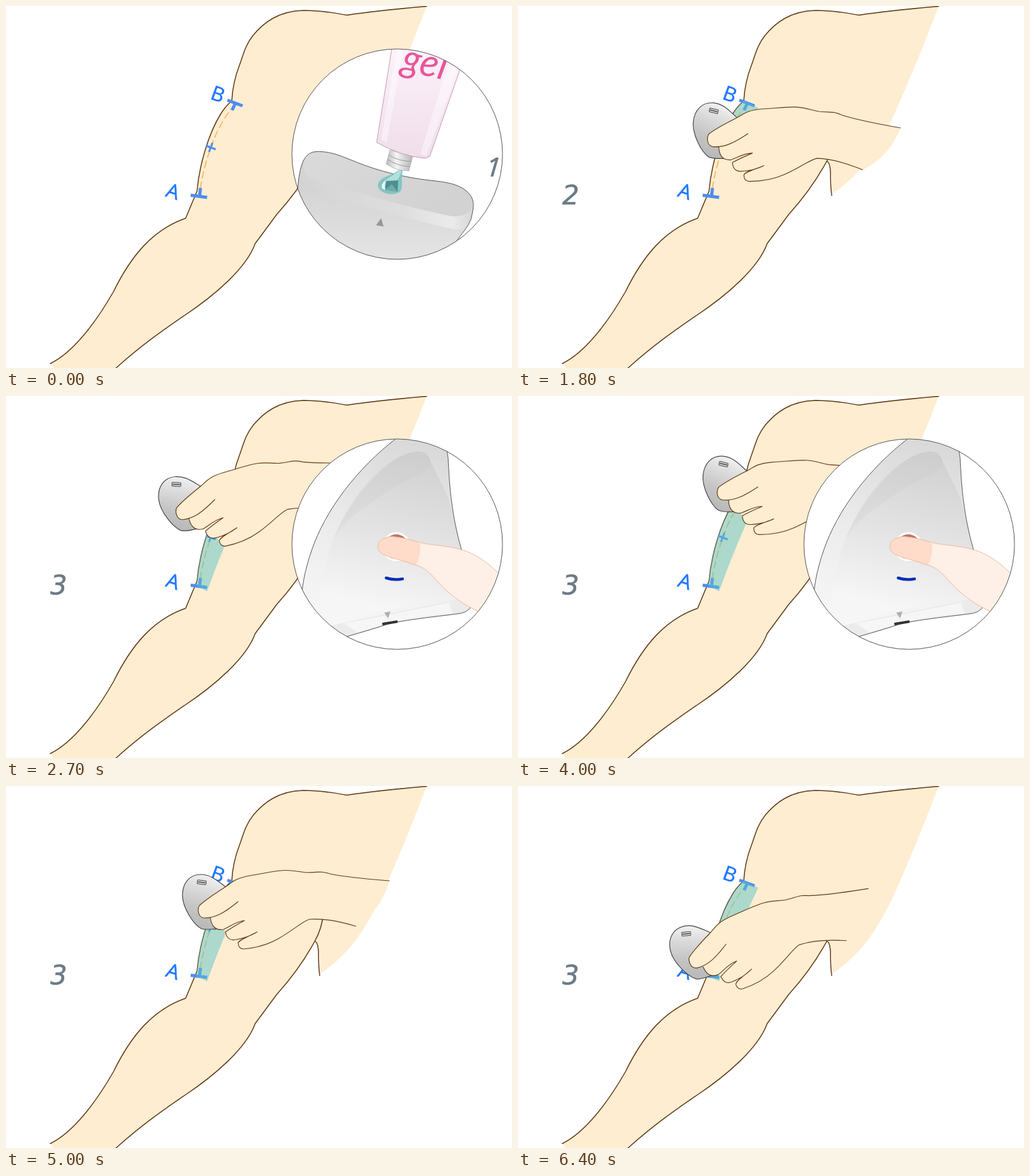
Write an HTML page that moves like this. It is 800 by 573 pixels and loops after 6.5 s.

```html
<!DOCTYPE html>
<html lang="en">
<head>
<meta charset="utf-8">
<title>Gel treatment steps</title>
<style>
html, body { margin: 0; width: 100%; height: 100%; overflow: hidden; background: #fff; }
svg { display: block; width: 100%; height: 100%; }
.skin { fill: #ffedd1; }
.line { fill: none; stroke: #603813; stroke-width: 1.5; stroke-linejoin: round; stroke-linecap: round; }
.thin { stroke-width: 1.15; }
.mark { fill: none; stroke: #4b8df2; stroke-width: 5; }
.label { font: 32px "Open Sans", "Noto Sans", sans-serif; fill: #1f78ff; stroke: #1f78ff; stroke-width: .5; }
.step { font: italic 42px "DejaVu Sans", sans-serif; fill: #6b7b85; stroke: #6b7b85; stroke-width: .6; }
.edge { fill: none; stroke: #555; stroke-width: 1; }
</style>
</head>
<body>
<svg viewBox="0 0 800 573" preserveAspectRatio="none">
  <defs>
    <clipPath id="round"><circle cx="618.5" cy="234.5" r="166.5"/></clipPath>
    <clipPath id="swept"><rect id="sweep" width="800" height="573"/></clipPath>
    <linearGradient id="shell" x1=".65" y1="0" x2=".4" y2="1">
      <stop stop-color="#f4f4f4"/><stop offset=".3" stop-color="#dcdcdc"/>
      <stop offset=".65" stop-color="#c4c4c4"/><stop offset="1" stop-color="#b8b8b8"/>
    </linearGradient>
    <linearGradient id="tube" x1="0" y1="0" x2="0" y2="1">
      <stop stop-color="#fbf4fa"/><stop offset="1" stop-color="#f1ddeb"/>
    </linearGradient>
    <linearGradient id="metal">
      <stop stop-color="#bbb"/><stop offset=".4" stop-color="#f4f4f4"/><stop offset="1" stop-color="#b4b4b4"/>
    </linearGradient>
    <linearGradient id="front" x1="0" y1="0" x2="0" y2="1">
      <stop stop-color="#cbcbcb"/><stop offset="1" stop-color="#e6e6e6"/>
    </linearGradient>
    <linearGradient id="top" x1="0" y1="0" x2="1" y2=".4">
      <stop stop-color="#dadada"/><stop offset="1" stop-color="#d2d2d2"/>
    </linearGradient>
    <linearGradient id="band">
      <stop stop-color="#d4d4d4"/><stop offset=".6" stop-color="#dedede"/><stop offset=".88" stop-color="#ebebeb"/><stop offset="1" stop-color="#d6d6d6"/>
    </linearGradient>
    <linearGradient id="back" x1=".6" y1="0" x2=".4" y2="1">
      <stop stop-color="#d8d8d8"/><stop offset=".5" stop-color="#ececec"/><stop offset="1" stop-color="#f8f8f8"/>
    </linearGradient>
    <linearGradient id="panel" x1=".6" y1="0" x2=".4" y2="1">
      <stop stop-color="#d0d0d0"/><stop offset=".5" stop-color="#e4e4e4"/><stop offset=".9" stop-color="#f6f6f6"/>
    </linearGradient>
  </defs>

  <!-- leg and hip -->
  <path class="skin" d="M70 566C105 549 141 503 170 452C198 395 232 354 284 336L302 293C305 258 318 205 340 170Q346 160 357 150C358 131 362 112 369 94C375 78 378 62 391 46C407 27 430 8 470 7C500 7 525 12 539 14.500C580 8 625 4 665 0.500C644 56 621 112 599 162C572 222 545 265 497 297L495 262Q493 246 488 246C475 270 455 300 428 330L394 376C380 415 330 458 282 490C250 512 215 536 174 573H75Z"/>
  <path class="line" d="M70 566C105 549 141 503 170 452C198 395 232 354 284 336L302 293C305 258 318 205 340 170Q346 160 357 150C358 131 362 112 369 94C375 78 378 62 391 46C407 27 430 8 470 7C500 7 525 12 539 14.500C580 8 625 4 665 0.500"/>
  <path class="line" d="M174 573C215 536 250 512 282 490C330 458 380 415 394 376L428 330C455 300 475 270 488 246C497 230 499 219 502 203L507 197M488 246Q493 246 494 262Q494 285 496 300"/>

  <!-- treatment line from A to B -->
  <path d="M307 290Q313 253 324 224Q336 188 357 162" fill="none" stroke="#ffad4f" stroke-width="1.500" stroke-dasharray="12 5"/>
  <path class="mark" d="M292 299.500L318 303M306 301L307.500 288M350 149L374 158M362.500 154L357.500 165"/>
  <path class="mark" style="stroke-width:3" d="M316 221L331.500 227M326.500 216.500L321 231"/>
  <text class="label" transform="translate(251 301) rotate(18)">A</text>
  <text class="label" transform="translate(321.500 146.500) rotate(20)">B</text>
  <path id="film" clip-path="url(#swept)" fill="#5cc4c8" fill-opacity=".5" d="M357 150L380 161Q348 226 318 309L301 301C304 258 318 205 340 170Q346 160 357 150Z"/>

  <!-- hand with device, origin at the slot -->
  <g id="hand"><g transform="translate(-309.5 -152.5)">
    <path d="M352 163C337 153 326 140 308 140C290 140 279 154 279 173C279 192 296 219 309 226Q316 228 332 226Z" fill="url(#shell)" stroke="#444" stroke-width="1.200"/>
    <g transform="translate(309.5 152.5) rotate(8)" fill="#ddd" stroke="#444">
      <rect x="-7" y="-3" width="14" height="6" rx="1"/><path d="M-6 0H6" stroke-width="1.500"/>
    </g>
    <path class="skin" d="M606 150Q594 196 553 222C530 215 505 209 480 211C470 213 455 228 430 242C414 251 398 256 376 258Q368 258 367 249L364 243Q350 245 347 231L344 227Q325 228 323 208L313 209C302 207 303 193 306 189C318 178 334 168 348 159C358 152 363 146 385 142C405 139 425 134 440 133.500C455 133 462 136 475 137C495 137 497 134 512 139Q540 145 606 150Z"/>
    <path class="line thin" d="M606 150Q540 145 512 139C497 134 495 137 475 137C462 136 455 133 440 133.500C425 134 405 139 385 142C363 146 358 152 348 159C334 168 318 178 306 189C303 193 302 207 313 209C331 209 345 201 367 183M323 208C325 224 333 229 344 227C355 222 362 215 377 213C364 220 357 224 347 231C349 242 355 245 364 243C378 241 387 237 397 231C382 239 367 244 367 249Q368 258 376 258C398 256 414 251 430 242C455 228 470 213 480 211C505 209 530 215 553 222"/>
  </g></g>

  <text id="step" class="step" x="70" y="314"></text>

  <!-- close-up: gel on the head -->
  <g id="gel">
    <g clip-path="url(#round)">
      <circle cx="618.5" cy="234.5" r="166.5" fill="#fff"/>
      <path d="M461 292C464 253 470 230.500 492 230.500C532 229.500 550 255 640 271.500C680 279 706 276 727 292C744 306 739 320 735 338C729 352 722 358 711 374L690 410H450Z" fill="url(#front)"/>
      <path d="M466 256Q464 272 468 281C530 309 620 334 712 354Q737 353 739 318L700 310Z" fill="url(#band)"/>
      <path d="M492 230.500C532 229.500 550 255 640 271.500C680 279 706 276 727 292Q739 303 738 318Q726 337 700 332C630 317 560 297 490 276C466 268 466 248 478 234Q484 230.500 492 230.500Z" fill="url(#top)"/>
      <path class="edge" d="M461 292C464 253 470 230.500 492 230.500C532 229.500 550 255 640 271.500C680 279 706 276 727 292C744 306 739 320 735 338C729 352 722 358 711 374"/>
      <path d="M593 336L597 349L585 347Z" fill="#979797"/>
      <path d="M622 258C612 270 590 268 588 284C589 298 613 301 623 294C629 286 624 277 627 261Z" fill="#82c6c2"/>
      <path d="M622 258C614 271 594 273 594 288Q602 296 611 278Q620 280 625 262Z" fill="#b3dedb"/>
      <path d="M601 277L620 276L619 294L599 291Z" fill="#4c908f"/>
      <path d="M599 291L610 282L619 294Z" fill="#6fabab"/>
      <path d="M601 276Q592 281 595 289L600 291Q596 282 601 276Z" fill="#fff"/>
      <path d="M607 228L643 238L637 261Q617 261 601 250Z" fill="url(#metal)" stroke="#aaa" stroke-width=".7"/>
      <path d="M605 236Q622 246 641 246M603 243Q621 254 639 254" fill="none" stroke="#999"/>
      <path d="M612 55L586 216Q625 238 663 241L670 238L725 80V55Z" fill="url(#tube)" stroke="#c29ab4"/>
      <path d="M620 55L593 212L602 216L630 55ZM710 55L655 235L665 237L722 80Z" fill="#fff" fill-opacity=".4"/>
      <text transform="translate(623 101) rotate(13)" font-family="Lato, Open Sans, sans-serif" font-style="italic" font-size="61" fill="#e9559b">gel</text>
    </g>
    <circle class="edge" cx="618.5" cy="234.500" r="166.500"/>
    <text x="759" y="270" transform="rotate(4 772 255)" class="step" style="font-family:'Open Sans',sans-serif">1</text>
  </g>

  <!-- close-up: pressing the button -->
  <g id="press">
    <g clip-path="url(#round)">
      <circle cx="618.5" cy="234.5" r="166.5" fill="#fff"/>
      <path d="M617 67C555 115 505 180 483 245C472 277 467 305 467 330L490 393L538 381Q580 369 607 360C640 353 690 348 712 345Q730 344 736 332L720 243C705 190 701 145 699 98L696 80L680 60Z" fill="url(#back)"/>
      <path d="M648 88Q668 86 672 105L699 160L722 250L738 310L495 362C495 290 509 226 550 167C590 112 620 92 648 88Z" fill="url(#panel)"/>
      <path d="M648 88Q668 86 671 105C670 125 640 125 590 160C560 180 530 200 516 231C545 154 602 94 648 88Z" fill="#c4c4c4" fill-opacity=".2"/>
      <path d="M500 367C580 347 655 337 732 317Q739 329 731 338Q724 345 712 345C690 348 640 353 607 360Q580 369 538 381Z" fill="#ebebeb"/>
      <path d="M535 360Q630 342 700 327L706 344Q650 349 607 359L555 374Z" fill="#f6f6f6"/>
      <path class="edge" d="M617 67C555 115 505 180 483 245C472 277 467 305 467 330M538 381Q580 369 607 360C640 353 690 348 712 345Q730 344 736 332M720 243C705 190 701 145 699 98L696 80"/>
      <path d="M598 343L608 341L604 352Z" fill="#b0b0b0"/>
      <path d="M595 361L619 357" stroke="#333" stroke-width="4"/>
      <path d="M601 288Q614 292 627 289.500" fill="none" stroke="#0730b5" stroke-width="4.500" stroke-linecap="round"/>
      <circle cx="617" cy="238.500" r="23" fill="#fff"/>
      <circle cx="617" cy="238.500" r="19.500" fill="#bb7865"/>
      <path d="M588 237C590 227 601 221 615 223C635 225 648 231 664 234C710 240 738 240 778 280L800 310L746 341C720 328 701 315 680 291C660 267 650 269 624 260C603 254 587 251 588 237Z" fill="#fef0e6"/>
      <path d="M588 237C590 227 601 221 615 223C632 225 643 229 654 232Q658 249 648 268L624 260C603 254 587 251 588 237Z" fill="#fedcc9"/>
      <path d="M746 341C720 328 701 315 680 291C660 267 650 269 624 260C603 254 587 251 588 237C590 227 601 221 615 223C635 225 648 231 664 234C710 240 738 240 778 280" fill="none" stroke="#f2b3a0"/>
    </g>
    <circle class="edge" cx="618.500" cy="234.500" r="166.500"/>
  </g>
</svg>
<script>
const $ = id => document.getElementById(id);
const LOOP = 6500, TICK = 100;
// time, slot x, slot y, angle
const poses = [
  [100, 263, 158, -8], [700, 282, 141, -2], [1100, 302, 124, 3.4],
  [1400, 336, 106, 6], [1800, 309.5, 166, 5.7], [2200, 283, 226, 5.5],
  [2700, 269.5, 140, -6.3], [3500, 269.5, 140, -6.3], [4100, 336, 101.5, 8],
  [5000, 309.5, 152.5, 0], [6400, 266, 234, -13.5]
];

function poseAt(t) {
  const i = Math.max(1, poses.findIndex(p => p[0] >= t));
  const a = poses[i - 1], b = poses[i];
  const k = (t - a[0]) / (b[0] - a[0]);
  return a.map((v, j) => v + (b[j] - v) * k);
}

const show = (id, on) => $(id).setAttribute('display', on ? 'inline' : 'none');

function draw(now) {
  const t = Math.floor(now % LOOP / TICK) * TICK;
  const [, x, y, angle] = poseAt(t);
  $('hand').setAttribute('transform', `translate(${x} ${y}) rotate(${angle})`);
  $('sweep').setAttribute('height', t < 2200 ? y + 50 : 573);
  $('step').textContent = t < 1400 ? '' : t < 2300 ? '2' : '3';
  show('hand', t >= 100);
  show('film', t >= 1400);
  show('gel', t < 800);
  show('press', t >= 2300 && t < 4200);
}

const start = performance.now();
function loop() {
  draw(performance.now() - start);
  requestAnimationFrame(loop);
}
loop();
</script>
</body>
</html>
```
